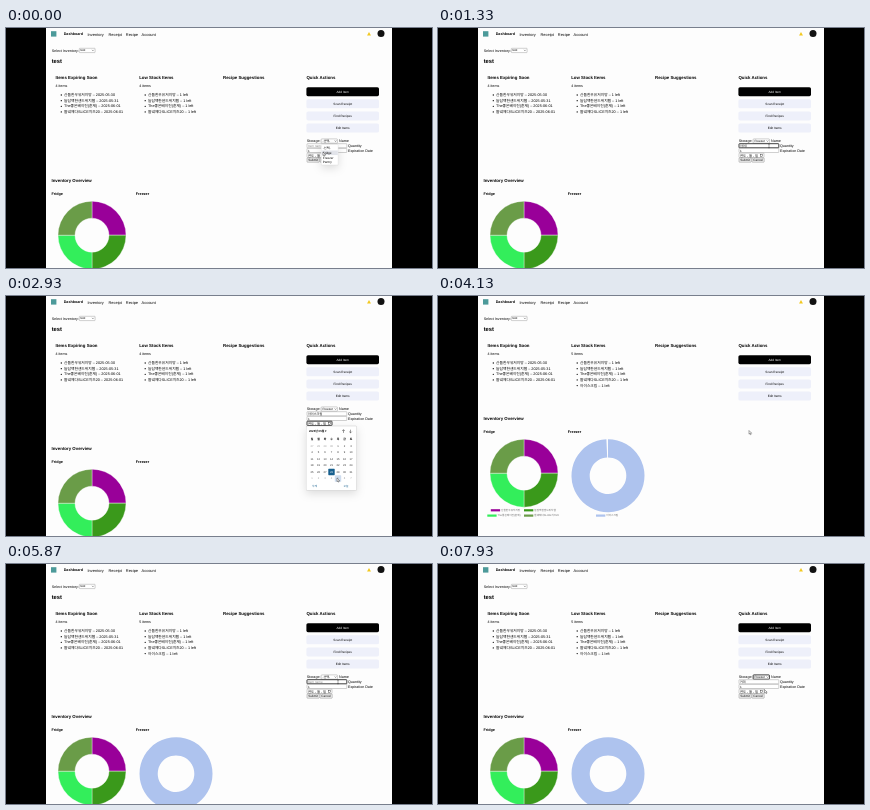
An HTML page for the animation above (8 s loop, 426x240 px).

```html
<!DOCTYPE html>
<html lang="ko">
<head>
<meta charset="utf-8">
<title>Inventory dashboard</title>
<style>
html, body { margin: 0; width: 100%; height: 100%; overflow: hidden; background: #000; }
svg { display: block; width: 100vw; height: 100vh; }
text {
  font-family: "Liberation Sans", "Noto Sans CJK KR", "Noto Sans CJK", sans-serif;
  text-rendering: geometricPrecision;
  white-space: pre;
}
.popup { filter: drop-shadow(0 3px 4px rgba(0, 0, 0, .13)); }
</style>
</head>
<body>
<svg id="stage" viewBox="0 0 426 240"></svg>
<script>
const LOOP = 8000;
const stage = document.getElementById('stage');

function add(parent, tag, attrs, content) {
  const el = document.createElementNS('http://www.w3.org/2000/svg', tag);
  for (const key in attrs) el.setAttribute(key, attrs[key]);
  if (content !== undefined) el.textContent = content;
  parent.appendChild(el);
  return el;
}
const group = (parent, attrs) => add(parent, 'g', attrs);
const rect = (p, x, y, width, height, fill, more) =>
  add(p, 'rect', { x, y, width, height, fill, ...more });
const field = (p, x, y, w, h) =>
  rect(p, x, y, w, h, '#fff', { stroke: '#888', 'stroke-width': .4, rx: .5 });
// y is the vertical middle of the letters
const label = (p, x, y, str, size = 3.65, more) =>
  add(p, 'text', { x, y: y + size * .35, 'font-size': size, fill: '#000', ...more }, str);
const BOLD = { 'font-weight': 700 };
const MID = { 'text-anchor': 'middle' };
const show = (el, on) => el.setAttribute('display', on ? 'inline' : 'none');

function ring(cx, cy, outer, inner, from, to) {
  const at = (r, a) => `${cx + r * Math.sin(a)} ${cy - r * Math.cos(a)}`;
  const big = to - from > Math.PI ? 1 : 0;
  return `M${at(outer, from)}A${outer} ${outer} 0 ${big} 1 ${at(outer, to)}` +
    `L${at(inner, to)}A${inner} ${inner} 0 ${big} 0 ${at(inner, from)}Z`;
}

// Page and navigation
rect(stage, 0, 0, 426, 240, '#000');
rect(stage, 40, 0, 346, 240, '#fdfdfd');
rect(stage, 45, 3.2, 5.4, 5.4, '#4c9a9a');
label(stage, 57.7, 6.2, 'Dashboard', 3.7, BOLD);
[[81.5, 'Inventory'], [102.5, 'Receipt'], [119.8, 'Recipe'], [135.6, 'Account']]
  .forEach(([x, s]) => label(stage, x, 6.2, s, 3.95));
add(stage, 'path', { d: 'M361 7.6L363 4L365 7.6Z', fill: '#f2c81e' });
add(stage, 'circle', { cx: 375, cy: 5.4, r: 3.5, fill: '#111' });
label(stage, 45.7, 22.3, 'Select Inventory:');
field(stage, 73.3, 20.3, 15.8, 4.3);
label(stage, 74.4, 22.4, 'test', 3.1);
add(stage, 'path', { d: 'M86 21.8l.9 1 .9-1', fill: 'none', stroke: '#222', 'stroke-width': .4 });
label(stage, 45.7, 32.6, 'test', 5.8, BOLD);
[[49.5, 'Items Expiring Soon'], [133.2, 'Low Stock Items'], [217, 'Recipe Suggestions'], [300.4, 'Quick Actions']]
  .forEach(([x, s]) => label(stage, x, 49, s, 4.35, BOLD));

// Item lists
const items = [
  ['산들한우유저지방', '2025-05-30', '#990099'],
  ['늘담백한샌드위치햄', '2025-05-31', '#3a991b'],
  ['The좋은베이컨(훈제)', '2025-06-01', '#33ee5b'],
  ['들녘체다SLICE치즈20', '2025-06-01', '#6a9c48']
];
function bullet(p, x, row, str) {
  const y = 66.8 + row * 5.65;
  add(p, 'circle', { cx: x, cy: y + .2, r: .65, fill: '#000' });
  label(p, x + 2.8, y, str, 3.75);
}
label(stage, 49.5, 58, '4 items');
const lowCount = label(stage, 133.2, 58, '');
items.forEach(([name, date], i) => {
  bullet(stage, 55.3, i, `${name} – ${date}`);
  bullet(stage, 139.2, i, `${name} – 1 left`);
});
const added = group(stage);
bullet(added, 139.2, 4, '아이스크림 – 1 left');

['Add Item', 'Scan Receipt', 'Find Recipes', 'Edit Items'].forEach((s, i) => {
  const y = 59.2 + i * 12.1;
  rect(stage, 300.4, y, 72.6, 9, i ? '#eef0fa' : '#000', { rx: 1.6 });
  label(stage, 336.7, y + 4.5, s, 3.15, { ...MID, fill: i ? '#000' : '#fff' });
});

// Charts
const overview = group(stage);
label(overview, 45.5, 152.3, 'Inventory Overview', 4.37, BOLD);
label(overview, 45.5, 166, 'Fridge', 3.75, BOLD);
label(overview, 129.8, 166, 'Freezer', 3.75, BOLD);
function legend(p, x, y, str, fill) {
  rect(p, x, y - 1, 9.3, 2.2, fill);
  label(p, x + 10.3, y, str, 2.6, { fill: '#666' });
}
const spots = [[52.8, 244.2], [86, 244.2], [49.3, 249.5], [86, 249.5]];
items.forEach(([name, , fill], i) => {
  const a = i * Math.PI / 2;
  add(overview, 'path', {
    d: ring(86, 207.2, 34, 17, a, a + Math.PI / 2), fill, stroke: '#fff', 'stroke-width': .35
  });
  legend(overview, ...spots[i], name, fill);
});
const freezer = group(overview);
const freezerRing = add(freezer, 'path', { fill: '#aec3ee' });
legend(freezer, 158, 249.5, '아이스크림', '#aec3ee');

// Item form
const form = group(stage);
label(form, 300.7, 113, 'Storage:');
const storageBox = field(form, 315.2, 110.9, 16.2, 4.3);
const storageText = label(form, 316.4, 113, '', 3.1);
add(form, 'path', { d: 'M328.6 112.5l.9 1 .9-1', fill: 'none', stroke: '#222', 'stroke-width': .4 });
label(form, 333, 113, 'Name');
const nameBox = field(form, 301, 115.7, 39.8, 4.1);
const nameText = label(form, 302, 117.8, '', 3.1);
const caret = rect(form, 302, 116.3, .35, 2.9, '#111');
label(form, 342, 117.8, 'Quantity');
field(form, 301, 120.4, 39.8, 4.1);
label(form, 302, 122.5, '1', 3.1);
label(form, 342, 122.5, 'Expiration Date');
const dateBox = field(form, 301, 125.2, 25, 4.3);
const dateText = label(form, 302, 127.4, '', 3.3);
rect(form, 322.6, 126.3, 2, 2, 'none', { stroke: '#222', 'stroke-width': .4 });
[['Submit', 301], ['Cancel', 314]].forEach(([s, x]) => {
  rect(form, x, 130, 12.2, 4.2, '#efefef', { stroke: '#777', 'stroke-width': .4, rx: .5 });
  label(form, x + 6.1, 132.1, s, 3.1, MID);
});

const menu = group(stage, { class: 'popup' });
rect(menu, 315.2, 116.5, 17, 20.5, '#fff', { stroke: '#ccc', 'stroke-width': .3, rx: .8 });
const menuMark = rect(menu, 315.6, 0, 16.2, 4.6, '#e2e4ea');
['-선택-', 'Fridge', 'Freezer', 'Pantry'].forEach((s, i) =>
  label(menu, 316.8, 120 + i * 4.8, s, 3.1));

// Date picker
const picker = group(stage, { class: 'popup' });
rect(picker, 300.2, 130, 50.4, 64.5, '#fff', { stroke: '#bbb', 'stroke-width': .4, rx: 1 });
label(picker, 303, 135.3, '2025년 05월 ▾', 2.8, BOLD);
[[337.5, -1], [344.5, 1]].forEach(([x, way]) => add(picker, 'path', {
  d: `M${x} ${135.3 - way * 1.6}v${way * 3.2}m-1.3 ${-way * 1.3}l1.3 ${way * 1.3} 1.3 ${-way * 1.3}`,
  fill: 'none', stroke: '#333', 'stroke-width': .5
}));
const colX = c => 306 + c * 6.5;
const rowY = r => 149.8 + r * 6.55;
[...'일월화수목금토'].forEach((s, c) => label(picker, colX(c), 143.2, s, 2.8, { ...MID, ...BOLD }));
rect(picker, 322.3, rowY(4) - 3.2, 6.4, 6.4, '#17608f', { rx: .6 });
const dayMark = rect(picker, colX(4) - 3.2, rowY(5) - 3.2, 6.4, 6.4, '#cfddee', { rx: .6 });
for (let i = 0; i < 42; i++) {
  const day = new Date(2025, 3, 27 + i);
  const fill = i === 31 ? '#fff' : day.getMonth() === 4 ? '#222' : '#999';
  label(picker, colX(i % 7), rowY(i / 7 | 0), day.getDate(), 2.7, { ...MID, fill });
}
label(picker, 308.5, 190, '삭제', 2.7, { ...MID, fill: '#17608f' });
label(picker, 340, 190, '오늘', 2.7, { ...MID, fill: '#17608f' });

const arrow = add(stage, 'path', { d: 'M0 0V3.7L.9 2.9 1.5 4.2 2.1 3.9 1.5 2.7H2.7Z', fill: '#fff', stroke: '#111', 'stroke-width': .35 });
const beam = add(stage, 'path', { d: 'M-.7-1.8H.7M0-1.8V1.8M-.7 1.8H.7', fill: 'none', stroke: '#222', 'stroke-width': .4 });

// Pointer stops: time, x, y
const route = [
  [0, 317, 124], [350, 320, 129], [750, 320, 129], [1000, 331, 118], [2050, 331, 118],
  [2250, 323, 127], [2450, 323, 127], [2850, 331, 182], [3080, 331, 182], [3320, 308, 132],
  [3450, 308, 132], [3700, 311, 134.5], [4250, 311, 134.5], [4650, 337, 64], [4850, 337, 64],
  [5400, 332, 118], [7250, 332, 118], [7400, 324, 113], [7550, 324, 113],
  [7680, 320, 129], [7780, 320, 129], [7930, 326.5, 125.5], [8000, 326.5, 126]
];
function pointer(t) {
  const i = Math.max(1, route.findIndex(p => p[0] > t));
  const [t0, x0, y0] = route[i - 1], [t1, x1, y1] = route[i];
  const k = (t - t0) / (t1 - t0), e = k * k * (3 - 2 * k);
  return [x0 + (x1 - x0) * e, y0 + (y1 - y0) * e];
}
const within = (t, a, b) => t >= a && t < b;
function typed(t, start, step, stages) {
  const i = Math.floor((t - start) / step);
  return i < 0 ? '' : stages[Math.min(i, stages.length - 1)];
}
const firstName = 'ㅇ 아 아이 아이ㅅ 아이스 아이스ㅋ 아이스크 아이스클 아이스크리 아이스크림'.split(' ');
const nextName = 'ㅋ 커 커ㅍ 커피'.split(' ');
function focus(el, on) {
  el.setAttribute('stroke', on ? '#111' : '#888');
  el.setAttribute('stroke-width', on ? .8 : .4);
}

function render(t) {
  const saved = t >= 3420, open = !saved || t >= 4780;
  show(form, open);
  show(added, saved);
  show(freezer, saved);
  lowCount.textContent = saved ? '5 items' : '4 items';
  overview.setAttribute('transform', `translate(0 ${open ? 0 : -30})`);
  if (saved) {
    const k = Math.min(1, (t - 3420) / 1000);
    const sweep = 2 * Math.PI * (1 - (1 - k) ** 4);
    freezerRing.setAttribute('d', ring(170, 209.7, 36.5, 18.3, 0, Math.min(sweep, 6.2825)));
  }

  const menuOpen = t < 740 || within(t, 7530, 7770);
  show(menu, menuOpen);
  const [x, y] = pointer(t);
  const choice = Math.max(0, Math.min(3, Math.round((y - 120) / 4.8)));
  menuMark.setAttribute('y', 117.7 + choice * 4.8);
  storageText.textContent = within(t, 740, 3420) || t >= 7770 ? 'Freezer' : '-선택-';

  const name = saved ? typed(t, 6900, 130, nextName) : typed(t, 1130, 95, firstName);
  const naming = within(t, 1000, 2250) || within(t, 5400, 7450);
  nameText.textContent = name || 'Item name';
  nameText.setAttribute('fill', name ? '#000' : '#888');
  focus(nameBox, naming);
  focus(storageBox, within(t, 740, 1000) || t >= 7450);
  focus(dateBox, within(t, 2270, 3300));
  show(caret, naming && (name || t % 1000 < 500));
  caret.setAttribute('x', 302.2 + name.length * 2.85);
  dateText.textContent = within(t, 3070, 3420) ? '2025-06-05' : '연도 - 월 - 일';

  show(picker, within(t, 2330, 3070));
  show(dayMark, t > 2780);
  const overName = open && !menuOpen && within(x, 301, 341) && within(y, 115.6, 120);
  show(arrow, !overName);
  show(beam, overName);
  (overName ? beam : arrow).setAttribute('transform', `translate(${x} ${y})`);
}

const begin = performance.now();
function tick() {
  render((performance.now() - begin) % LOOP);
  requestAnimationFrame(tick);
}
tick();
</script>
</body>
</html>
```
